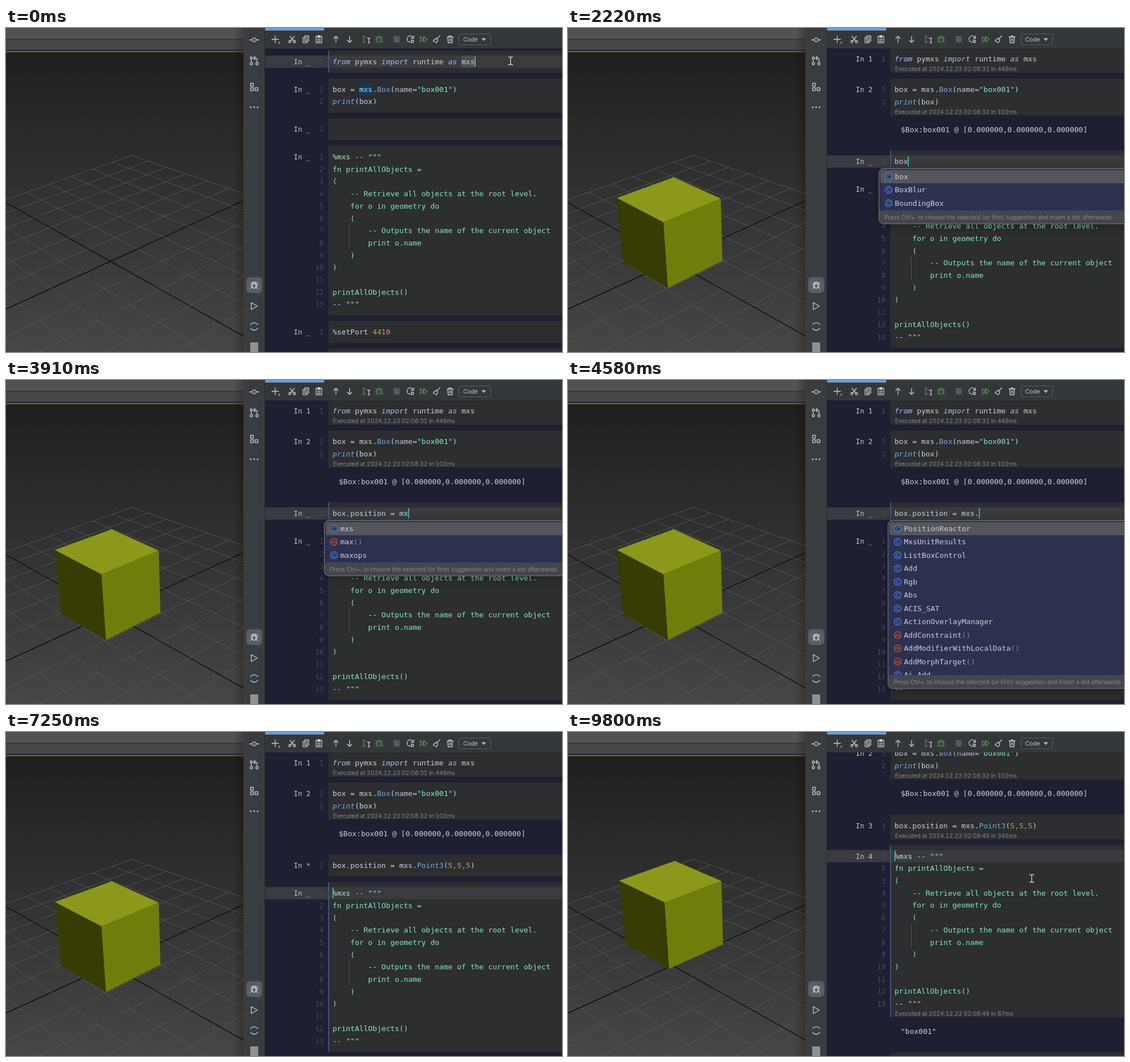
An HTML page for the animation above (9840 ms loop, 979 by 572 pixels).

```html
<!DOCTYPE html>
<html lang="en">
<head>
<meta charset="utf-8">
<title>Notebook and viewport</title>
<style>
  html, body { margin: 0; width: 100%; height: 100%; overflow: hidden; background: #1f1f33; }
  svg { display: block; width: 979px; height: 572px; }
  text { white-space: pre; font: 13px "DejaVu Sans Mono", "Noto Sans Mono", monospace; fill: #c8cfe0; font-variant-ligatures: none; }
  .ui { font: 10.25px Inter, "Open Sans", sans-serif; font-variant-numeric: tabular-nums; fill: #85888c; }
  .num { font-size: 12px; fill: #474c62; text-anchor: end; }
  .in { font-size: 12.2px; fill: #c4c8d2; }
  .k { fill: #adbbf2; font-style: italic; }
  .b { fill: #78a8f2; font-style: italic; }
  .f { fill: #70a9e8; }
  .p { fill: #cabde6; }
  .s { fill: #7eebbd; }
  .m { fill: #b8e0d8; }
  .n { fill: #d8916c; }
  .g { fill: #73777c; font-style: italic; }
  .d { fill: #868b98; }
  .icon { fill: none; stroke: #c6cacd; stroke-width: 1.3; stroke-linecap: round; stroke-linejoin: round; }
</style>
</head>
<body>
<svg id="stage" viewBox="0 0 979 572" xmlns="http://www.w3.org/2000/svg"></svg>
<script>
const LOOP = 9840;
const X = 575, CW = 7.827, LINE = 21.7, PAD = 19.4, GAP = 10;

const rect = (x, y, w, h, fill, extra = '') =>
  `<rect x="${x}" y="${y}" width="${w}" height="${h}" fill="${fill}" ${extra}/>`;
const poly = (pts, fill) => `<polygon points="${pts}" fill="${fill}"/>`;
const icon = (x, y, d, color = '#c6cacd', fill = 'none') =>
  `<path class="icon" transform="translate(${x} ${y})" d="${d}" style="stroke:${color};fill:${fill}"/>`;
// {c words} marks a coloured run, | the caret
const paint = s => s.replace('|', '').replace(/\{(\w) ([^}]*)\}/g, '<tspan class="$1">$2</tspan>');
const plain = s => s.replace(/\{\w ([^}]*)\}/g, '$1');
const text = (x, y, s, cls = '') => `<text class="${cls}" x="${x}" y="${y + 4.6}">${paint(s)}</text>`;
const label = (x, y, s, color = '#85888c') =>
  `<text class="ui" x="${x}" y="${y + 3.7}" style="fill:${color}">${s}</text>`;
const latest = (list, t) => list.filter(e => e[0] <= t).pop();

// ---------- viewport ----------
// Perspective of the ground plane, a and b run from -1 to 1
function ground(a, b) {
  const g = .269, h = .179, w = 1 + g * a + h * b;
  const mix = (o, p, q) => (o + a * (p * (1 + g) - o) + b * (q * (1 + h) - o)) / w;
  return [mix(184, -6, 434), mix(412, 305, 297.5)];
}

function grid() {
  const cellsPerSide = 6;
  let lines = '', axes = '';
  for (let i = -cellsPerSide; i <= cellsPerSide; i++) {
    const k = i / cellsPerSide;
    const d = `M${ground(k, -1)}L${ground(k, 1)}M${ground(-1, k)}L${ground(1, k)}`;
    if (i) lines += d; else axes += d;
  }
  return `<g clip-path="url(#view)" fill="none">
    <path d="${lines}" stroke="#5a5a5a" stroke-width=".9"/>
    <path d="${axes}" stroke="#050505" stroke-width="1.2"/></g>`;
}

function cube(t) {
  if (t < 1120) return '';
  const [back, right, front, left, bl, bf, br] = t < 7330
    ? [[186, 263.5], [269, 301], [168, 343], [86, 300], [98, 414], [176, 459], [272, 411]]
    : [[188, 227.5], [270, 263], [170, 301], [90, 262.5], [102, 374], [178, 418], [273, 375]];
  return poly([left, front, bf, bl], '#383b03') + poly([front, right, br, bf], '#717d0b') +
    poly([back, right, front, left], '#8b981a');
}

// ---------- window chrome ----------
const BUG = 'M-3.2 -2.5a3.2 3.2 0 0 1 6.4 0v4a3.2 4 0 0 1 -6.4 0zM-3.2 -2.5h6.4M-6 -4l2.5 2M6 -4l-2.5 2M-6.5 .8h3M6.5 .8h-3M-6 5.5l2.7 -2M6 5.5l-2.7 -2';
const PLAY = 'M-5 -6v12l10.5 -6z';
const RING = 'm-2 0a2 2 0 1 0 4 0a2 2 0 1 0 -4 0';
const GREEN = '#548f52';

function chrome() {
  const side =
    icon(437, 21, 'M-8 0h4.6M3.4 0h4.6M-3.4 0a3.4 3.4 0 1 0 6.8 0a3.4 3.4 0 1 0 -6.8 0') +
    icon(437, 58, 'M-5 -5' + RING + 'M-5 5' + RING + 'M5 5' + RING + 'M-5 -3v6M5 3v-5q0 -3 -3 -3h-2M2 -8l-3 3l3 3') +
    icon(437, 104, 'M-6.5 -6.5h5v5h-5zM-6.5 1.5h5v5h-5zM1.5 1.5h5v5h-5z') +
    [431, 437, 443].map(x => `<circle cx="${x}" cy="140" r="1.4" fill="#c6cacd"/>`).join('') +
    rect(423, 440, 28, 28, '#5a5d61', 'rx="6"') + icon(437, 454, BUG, '#e0e2e4') +
    icon(437, 491, PLAY) +
    icon(437, 527, 'M-6.3 -3.2a7.6 7.6 0 0 1 12.6 0M-6.3 3.2a7.6 7.6 0 0 0 12.6 0') +
    rect(430, 555, 14, 17, '#8f9193');
  const bar =
    icon(474, 20, 'M-6 0h12M0 -6v12') + poly('479,27 482,27 482,24', '#c6cacd') +
    icon(504, 20, 'M-4 -5.5l7 8.5M4 -5.5l-7 8.5M-4 4' + RING + 'M4 4' + RING) +
    icon(528, 20, 'M-2 -6h7v9h-7zM-2 -3h-3v9h7v-3M0 -3h3M0 0h3') +
    icon(551, 20, 'M-5 -5h10v11h-10zM-2 -6.5h4v3h-4zM-2.5 0h5M-2.5 3h5') +
    icon(581, 20, 'M0 5.5v-11M-4 -1.5l4 -4l4 4') +
    icon(605, 20, 'M0 -5.5v11M-4 1.5l4 4l4 -4') +
    icon(634, 20, 'M-4.5 -6v12l4 -2.5M-4.5 -6l9 5.5', GREEN) + icon(639, 22, 'M-1.5 -4h3M0 -4v8M-1.5 4h3', '#c6cacd') +
    icon(657, 20, BUG, GREEN) +
    icon(712, 20, 'M5 -2a5.5 5.5 0 1 0 -5.5 7M5.5 -6v4h-4M1.5 1.5h4v4h-4z') +
    icon(735, 20, 'M-5.5 -5v10l6 -5zM.5 -5v10l6 -5z', GREEN) +
    icon(758, 20, 'M6 -6.5l-5 5.5M-1 -2l3.5 3l-2.5 5l-6 -3z') +
    icon(782, 20, 'M-5.5 -4h11M-2 -4v-2h4v2M-4.2 -4l.6 10h7.2l.6 -10M-1.3 -1v4M1.3 -1v4') +
    rect(797.5, 10.5, 56, 19, 'none', 'rx="3" stroke="#5d6063"') +
    label(805, 20, 'Code', '#c3c6c9') + poly('837,18 845.5,18 841.2,23', '#b0b3b6');
  return rect(418, 0, 38, 572, '#3a3d40') + rect(455, 0, 1, 572, '#2a2c2f') +
    rect(456, 0, 523, 36, '#34373a') + rect(456, 0, 104.5, 4.5, '#6a9fd9', 'rx="1.5"') + side + bar;
}

const stop = t => rect(682.5, 14.5, 11, 11,
  (t >= 580 && t < 890) || (t >= 1080 && t < 1400) ? '#c9524e' : '#56595c', 'rx="1"');

// ---------- notebook ----------
const typing = [
  [0, '|'], [1900, 'b|'], [2060, 'bo|'], [2180, 'box|'], [2300, 'box.|'], [2420, 'box.p|'], [2520, 'box.po|'],
  [2620, 'box.pos|{g ition = mxs}'], [2810, 'box.posi|{g tion = mxs}'], [3050, 'box.posit|{g ion = mxs}'],
  [3120, 'box.positi|{g on = mxs}'], [3200, 'box.positio|{g n = mxs}'], [3240, 'box.position|{g  = mxs}'],
  [3390, 'box.position |{g = mxs}'], [3630, 'box.position =|'], [3670, 'box.position = |'],
  [3750, 'box.position = m|'], [3910, 'box.position = mx|'], [4260, 'box.position = mxs|'],
  [4460, 'box.position = mxs.|'], [4960, 'box.position = mxs.P|'], [5160, 'box.position = mxs.Po|'],
  [5660, 'box.position = mxs.Point3|'], [5900, 'box.position = mxs.Point3(|)'],
  [6090, 'box.position = mxs.{f Point3}(|)'], [6280, 'box.position = mxs.{f Point3}({n 5}|)'],
  [6340, 'box.position = mxs.{f Point3}({n 5,}|)'], [6400, 'box.position = mxs.{f Point3}({n 5,5}|)'],
  [6470, 'box.position = mxs.{f Point3}({n 5,5,}|)'], [6630, 'box.position = mxs.{f Point3}({n 5,5,5}|)']
];

const script = ['{m %mxs} {s -- """}'].concat([
  'fn printAllObjects =', '(', '    -- Retrieve all objects at the root level.', '    for o in geometry do',
  '    (', '        -- Outputs the name of the current object', '        print o.name', '    )', ')', '',
  'printAllObjects()', '-- """'].map(s => `{s ${s}}`));

const cells = [
  { code: ['{k from} pymxs {k import} runtime {k as} mxs'], run: 580, done: 740, info: '02:08:31 in 449ms' },
  { code: ['box = mxs.{f Box}({p name=}{s "box001"})', '{b print}(box)'], run: 1080, done: 1170,
    info: '02:08:32 in 102ms', out: '$Box:box001 @ [0.000000,0.000000,0.000000]' },
  { run: 7250, done: 7460, info: '02:08:45 in 345ms' },
  { code: script, run: 8870, done: 8910, info: '02:08:49 in 87ms', out: '"box001"' },
  { code: ['%setPort {n 4410}'] },
  { code: [''] }
];

function scrollTop(t) {
  if (t < 740) return 59.3;
  if (t < 7730) return 54.4;
  const k = Math.min(1, Math.ceil((t - 7689) / 40) / 6);
  return 54.4 - 70.5 * k * k * (3 - 2 * k);
}

function notebook(t) {
  const current = cells.slice(0, 3).filter(c => c.run <= t).length;
  const usages = t < 580 || (t >= 4300 && t < 4460);
  const typed = latest(typing, t)[1];
  let y = scrollTop(t), s = '';
  cells.forEach((cell, i) => {
    const code = cell.code || [typed];
    const done = cell.done <= t, last = y + (code.length - 1) * LINE;
    const top = y - PAD, bottom = last + PAD + (done ? 5 : 0);
    s += rect(567.5, top, 412, bottom - top, '#2c2e2f');
    if (i === current) {
      s += rect(456, y - 10.8, 523, 21.7, '#393b3e') + rect(567.2, top, 1.8, bottom - top, '#4b5286');
    }
    if (usages && i < 3) {
      const col = [29, 6, 15][i];
      if (i < 2 || t >= 4300) s += rect(X + col * CW, y - 10.8, 3 * CW, 21.6, i ? '#0f3b5c' : '#4b4e51');
    }
    const mark = done ? i + 1 : cell.run <= t ? '*' : '_';
    s += text(506.8, y, 'In ' + mark, 'in');
    code.forEach((line, n) => {
      s += text(559, y + n * LINE, String(n + 1), 'num') + text(X, y + n * LINE, line);
    });
    if (code === script) s += rect(604, y + 5.5 * LINE, 1, 2 * LINE, '#4a4f7c');
    if (i === 2 && t >= 6980 && t < 7250) {
      s += `<path d="M771 ${y + 8}${'l2 -2l2 2'.repeat(13)}" fill="none" stroke="#8a7f4a"/>`;
    }
    if (i === current) {
      const col = i === 0 ? 32 : i === 2 ? plain(typed).indexOf('|') : 0;
      s += rect(X + col * CW, y - 9.5, 1.5, 18.5, '#45d3b4');
    }
    if (done) s += label(575.8, last + 18.3, 'Executed at 2024.12.23 ' + cell.info);
    if (done && cell.out) s += text(586, bottom + 24.7, cell.out);
    y = bottom + GAP + PAD + (done && cell.out ? 52 : 0);
  });
  return s;
}

// ---------- completion popup ----------
const general = 'PositionReactor MxsUnitResults ListBoxControl Add Rgb ';
const popups = [
  [0], [1940, 547.5], [1980, 547.5, 'box bool() bytes() bin() breakpoint() bytearray() BaseException BlockingIOError BufferError BytesWarning BrokenPipeError bisect'],
  [2180, 547.5, 'box BoxBlur BoundingBox'], [2300], [2340, 563.5, 'position pos parent pivot properties prop() print() pop() put() path point posx'],
  [2620], [3790, 560.5], [3830, 560.5, 'mxs map() max() min() memoryview() main module matrix mean() merge() mode() move()'],
  [3910, 560.5, 'mxs max() maxops'], [4260], [4500, 563.5],
  [4580, 563.5, general + 'Abs ACIS_SAT ActionOverlayManager AddConstraint() AddModifierWithLocalData() AddMorphTarget() Ai_Add'],
  [4770, 563.5, general + 'Point3 Box Sphere Cylinder addModifier() animate() Array'],
  [4960, 563.5, 'PositionReactor Point3 Point2 Plane Pyramid Path PathDeform Position_XYZ ProgressBar print() pickObject() Prism'],
  [5160, 563.5, 'PositionReactor Point3 Point2 Point4 PointHelper Position_XYZ PolyMeshObject Polygon PopupMenu polyOp() position() Pond'],
  [5620]
];
const HINT = 'Press Ctrl+. to choose the selected (or first) suggestion and insert a dot afterwards';

function popup(t) {
  const [, x, names] = latest(popups, t);
  if (!x) return '';
  const frame = (h, fill) => rect(x, 248, 440, h, fill, 'rx="8" stroke="#6d7076" stroke-width="1.3"');
  if (!names) return frame(296.5, 'none');
  const items = names.split(' ');
  const h = Math.min(296.5, items.length * 23.5 + 27), foot = 248 + h - 23.5;
  const rows = items.map((name, i) => {
    const y = 262.3 + i * 23.5, method = name.endsWith('()');
    const [line, fill] = method ? ['#d5604f', '#4a2b35'] : ['#5a8ff0', '#26365f'];
    return `<circle cx="${x + 17}" cy="${y}" r="6" fill="${fill}" stroke="${line}" stroke-width="1.1"/>` +
      `<text class="ui" x="${x + 17}" y="${y + 3.2}" text-anchor="middle" style="font-size:9px;fill:${line}">${method ? 'm' : 'C'}</text>` +
      text(x + 28, y, method ? name.slice(0, -2) + '{d ()}' : name);
  }).join('');
  return `<g style="filter:drop-shadow(0 3px 8px rgba(0,0,0,.35))">${frame(h, '#2d3150')}</g>` +
    rect(x + 2.5, 251, 430, 23, '#54565b', 'rx="4"') +
    `<clipPath id="list"><rect x="${x}" y="248" width="440" height="${foot - 248}"/></clipPath>` +
    `<g clip-path="url(#list)">${rows}</g>` +
    `<path d="M${x + .6} ${foot}H985V${248 + h - .6}H${x + 8}q-7.4 0 -7.4 -7.4z" fill="#44474a"/>` +
    label(x + 9.5, foot + 12.5, HINT);
}

function pointer(t) {
  if (t >= 80 && t < 7770) return '';
  const k = t < 9720 ? 0 : Math.min(3, Math.floor((t - 9680) / 40)) / 3;
  const [x, y] = t < 80 ? [888.5, 58] : [788.5 + 28 * k, 237 + 21.5 * k];
  return icon(x, y, 'M-3.5 -7q3.5 0 3.5 2v10q0 2 -3.5 2M3.5 -7q-3.5 0 -3.5 2M3.5 7q-3.5 0 -3.5 -2', '#d9dbdc');
}

// ---------- stage ----------
const stage = document.getElementById('stage');
stage.innerHTML = `
  <defs>
    <linearGradient id="sky" x2="0" y2="1"><stop stop-color="#1c1c1c"/><stop offset="1" stop-color="#464646"/></linearGradient>
    <linearGradient id="shade"><stop stop-opacity="0"/><stop offset="1" stop-opacity=".22"/></linearGradient>
    <clipPath id="view"><rect y="43" width="418" height="529"/></clipPath>
    <clipPath id="page"><rect x="456" y="36" width="523" height="536"/></clipPath>
  </defs>
  ${rect(0, 0, 418, 572, 'url(#sky)')}
  ${rect(0, 0, 418, 19, '#525252')}${rect(0, 19, 418, 1.2, '#2f2f2f')}
  ${rect(0, 20.2, 418, 17.8, '#474747')}${rect(0, 38, 418, 3, '#303030')}${rect(0, 41, 418, 1.6, '#85741f')}
  ${grid()}
  <g id="cube"></g>
  ${rect(400, 0, 18, 572, 'url(#shade)')}
  ${rect(456, 0, 523, 572, '#1f1f33')}
  <g id="notebook" clip-path="url(#page)"></g>
  ${chrome()}
  <g id="stop"></g><g id="popup"></g><g id="pointer"></g>`;

const layers = Object.entries({ cube, notebook, stop, popup, pointer })
  .map(([id, draw]) => ({ node: document.getElementById(id), draw, now: null }));

function render(t) {
  for (const layer of layers) {
    const markup = layer.draw(t);
    if (markup !== layer.now) layer.node.innerHTML = layer.now = markup;
  }
}

const start = performance.now();
function tick() {
  render((performance.now() - start) % LOOP);
  requestAnimationFrame(tick);
}
render(0);
requestAnimationFrame(tick);
</script>
</body>
</html>
```
